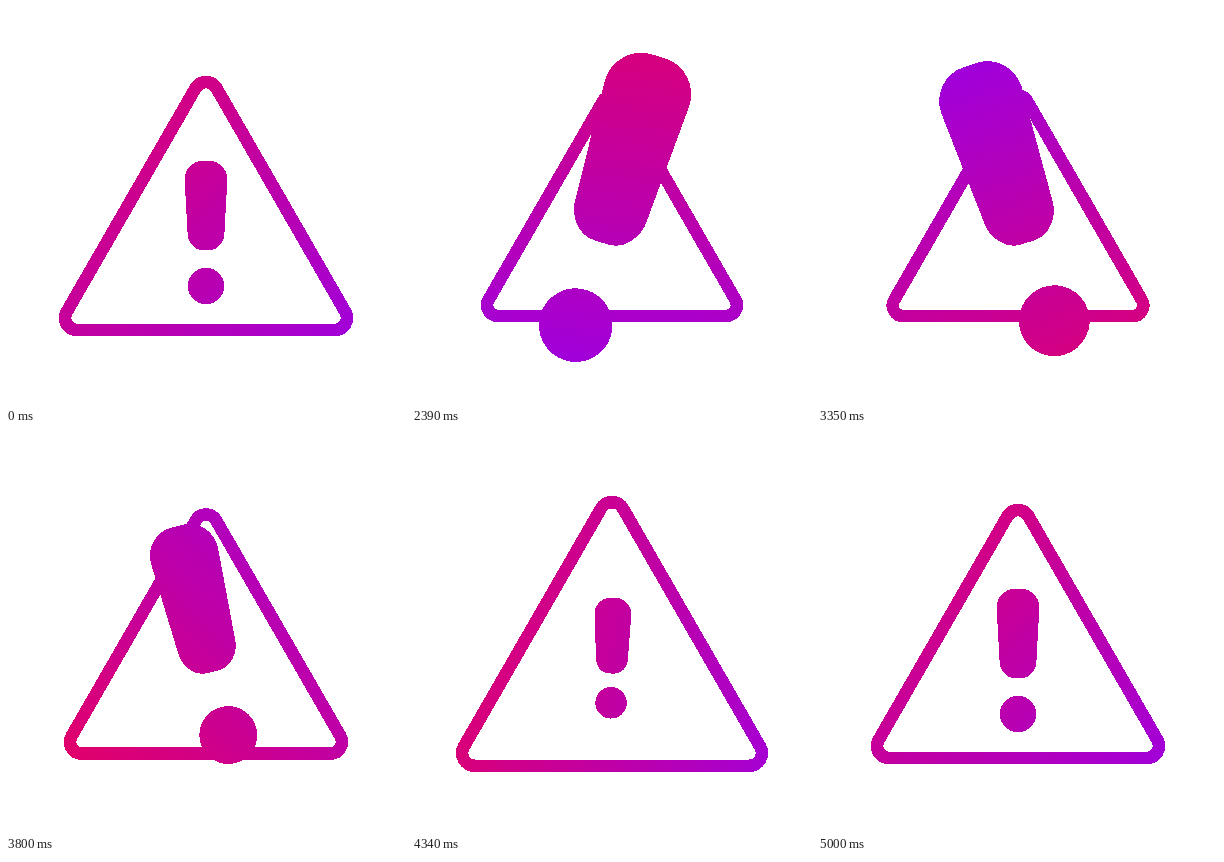
Write an HTML page that moves like this. It is 400 by 400 pixels and loops after 5030 ms.

```html
<!DOCTYPE html>
<html lang="en">
<head>
<meta charset="utf-8">
<title>Warning sign</title>
<style>
  html, body { margin: 0; width: 100%; height: 100%; overflow: hidden; background: #fff; }
  svg { display: block; width: 100vw; height: 100vh; }
</style>
</head>
<body>
<svg viewBox="0 0 400 400">
  <defs>
    <linearGradient id="paint" gradientUnits="userSpaceOnUse" x1="35" y1="200" x2="415" y2="200">
      <stop offset="0" stop-color="#e0006c"/>
      <stop offset="1" stop-color="#a000dc"/>
    </linearGradient>
    <mask id="sign" maskUnits="userSpaceOnUse" x="0" y="0" width="400" height="400">
      <g shape-rendering="crispEdges" stroke="#fff" stroke-linejoin="round">
        <path id="frame" fill="none" d="M189.6 82A12 12 0 0 1 210.4 82L339.4 306A12 12 0 0 1 329 324H71A12 12 0 0 1 60.6 306Z"/>
        <g id="mark" fill="#fff">
          <path d="M197 158.5H203A14.7 15 0 0 1 217.7 173.5L214.8 226.5A11.8 14 0 0 1 203 240.5H197A11.8 14 0 0 1 185.2 226.5L182.3 173.5A14.7 15 0 0 1 197 158.5Z"/>
          <circle cx="200" cy="280" r="14.5"/>
        </g>
      </g>
    </mask>
  </defs>
  <rect width="400" height="400" fill="url(#paint)" mask="url(#sign)"/>
</svg>
<script>
const LOOP = 5030, HOLD = 2030, STEP = 30, STEPS = 100;
const [paint, frame, mark] = ['paint', 'frame', 'mark'].map(id => document.getElementById(id));

// The mark swings out twice, then everything rebounds and settles.
const rest = { at: 0, frame: 1, mark: 1, tilt: 0, x: 0, y: 0 };
const poses = [
  rest,
  { ...rest, at: .15, frame: .88, mark: 2.35, tilt: 18, y: -26 },
  { ...rest, at: .3, frame: .935, mark: 1.3, tilt: 10, x: -4.5, y: -9 },
  { ...rest, at: .5, frame: .88, mark: 2.35, tilt: -23.5, y: -26 },
  { ...rest, at: .74, frame: 1.105, mark: .73, tilt: 2.5 },
  { ...rest, at: .86, frame: .942, mark: 1.13, tilt: -2.5, y: -8.5 },
  { ...rest, at: 1 },
];

const smooth = u => u * u * (3 - 2 * u);

function poseAt(p) {
  const i = Math.max(1, poses.findIndex(pose => p <= pose.at));
  const from = poses[i - 1], to = poses[i];
  const k = smooth((p - from.at) / (to.at - from.at));
  const pose = {};
  for (const key in rest) pose[key] = from[key] + (to[key] - from[key]) * k;
  return pose;
}

// Scales a shape about its centre while its outline keeps the same width.
function place(el, x, y, cy, angle, scale, outline) {
  el.setAttribute('transform',
    `translate(${x} ${y}) rotate(${angle}) scale(${scale}) translate(-200 ${-cy})`);
  el.setAttribute('stroke-width', outline / scale);
}

function draw(ms) {
  const t = ms % LOOP;
  const p = t < HOLD ? 0 : Math.min(1, (1 + Math.floor((t - HOLD) / STEP)) / STEPS);
  const pose = poseAt(p);
  place(frame, 200, 200, 200, 0, pose.frame, 12.5);
  place(mark, 200 + pose.x, 226 + pose.y, 226, pose.tilt, pose.mark, 7.3);
  const spin = 45 + 360 * p * (1 + p - p * p);
  paint.setAttribute('gradientTransform', `rotate(${spin} 245 200)`);
}

const start = performance.now();
function tick() {
  draw(performance.now() - start);
  requestAnimationFrame(tick);
}
tick();
</script>
</body>
</html>
```
